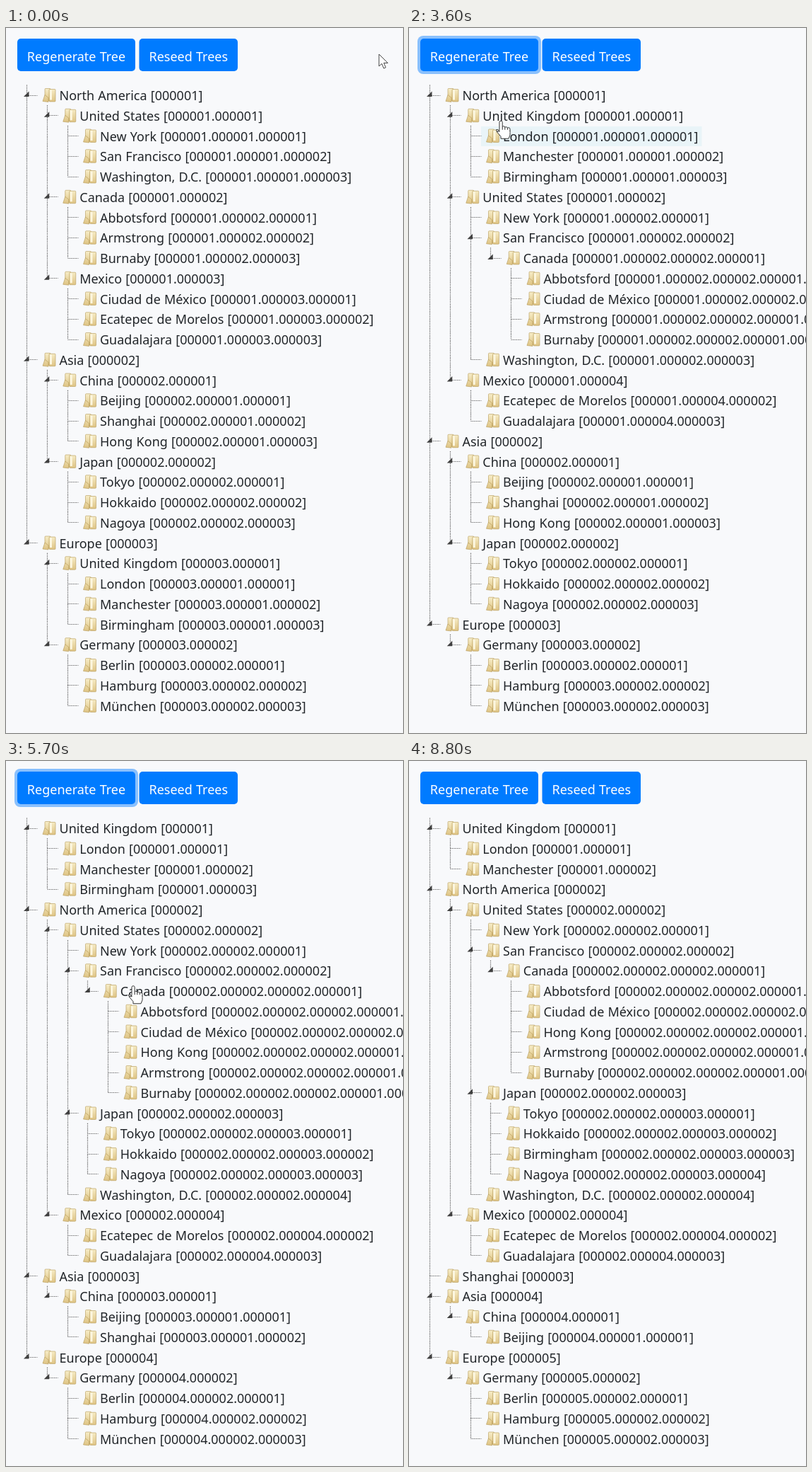
These frames come from a looping animation (562 px wide and 996 px high, 9.1 s). An HTML page with a canvas:

```html
<!DOCTYPE html>
<html lang="en">
<head>
<meta charset="utf-8">
<title>Tree drag and drop</title>
<style>
  html, body { margin: 0; width: 100%; height: 100%; overflow: hidden; background: #f8f9fb; }
  canvas { display: block; }
</style>
</head>
<body>
<canvas id="stage" width="562" height="996"></canvas>
<script>
const ctx = document.getElementById('stage').getContext('2d');
const LOOP = 9100, TICK = 100, ROW = 28.75, FIRST_ROW = 95.5, PALM = 9;
const CLICK = 1300, BLUR = 8700, EXIT = 8300;
const INK = '#212529';

const OUTLINE = `North America
 United States
  New York
  San Francisco
  Washington, D.C.
 Canada
  Abbotsford
  Armstrong
  Burnaby
 Mexico
  Ciudad de México
  Ecatepec de Morelos
  Guadalajara
Asia
 China
  Beijing
  Shanghai
  Hong Kong
 Japan
  Tokyo
  Hokkaido
  Nagoya
Europe
 United Kingdom
  London
  Manchester
  Birmingham
 Germany
  Berlin
  Hamburg
  München`;

const drag = (name, mode, target, x, pick, drop) => ({ name, mode, target, x, pick, drop });
const DRAGS = [
  drag('Canada', 'over', 'San Francisco', 165, 700, 1000),
  drag('Ciudad de México', 'after', 'Abbotsford', 190, 1700, 1900),
  drag('United Kingdom', 'before', 'United States', 130, 2700, 3600),
  drag('United Kingdom', 'before', 'North America', 130, 3700, 4200),
  drag('Hong Kong', 'after', 'Ciudad de México', 198, 4800, 5100),
  drag('Japan', 'after', 'San Francisco', 180, 5400, 5700),
  drag('Shanghai', 'before', 'Asia', 150, 6100, 6300),
  drag('Birmingham', 'after', 'Hokkaido', 146, 6600, 6900)
];

function buildTree(t) {
  const root = { children: [] }, byName = {}, open = [root];
  for (const line of OUTLINE.split('\n')) {
    const name = line.trim(), level = line.length - name.length;
    const parent = open[level], node = { name, parent, children: [] };
    node.num = parent.children.push(node);
    byName[name] = open[level + 1] = node;
  }
  for (const d of DRAGS) {
    if (t >= d.drop) moveNode(byName[d.name], d.mode, byName[d.target]);
  }
  // a first child stays folded until the tree is regenerated
  byName['San Francisco'].collapsed = t <= CLICK;
  return root;
}

function moveNode(node, mode, target) {
  const old = node.parent.children;
  old.splice(old.indexOf(node), 1);
  const inside = mode === 'over', step = Number(mode === 'after');
  const parent = node.parent = inside ? target : target.parent;
  const list = parent.children;
  const index = inside ? list.length : list.indexOf(target) + step;
  node.num = inside ? list.length + 1 : target.num + step;
  for (const sibling of list) if (sibling.num >= node.num) sibling.num++;
  list.splice(index, 0, node);
}

function listRows(parent, level = 0, prefix = '', rows = []) {
  for (const node of parent.children) {
    const path = prefix + String(node.num).padStart(6, '0');
    node.x = level * ROW;
    node.y = FIRST_ROW + rows.length * ROW;
    node.label = `${node.name} [${path}]`;
    rows.push(node);
    if (!node.collapsed) listRows(node, level + 1, path + '.', rows);
  }
  return rows;
}

const rowsAt = t => listRows(buildTree(t));
const rowNamed = (rows, name) => rows.find(row => row.name === name);

// The pointer visits each picked row, each drop spot and the first button.
const DROP_DY = { before: 7, over: 7, after: 21 };
const stop = (t, x, y) => ({ t, x, y });
const STOPS = [
  stop(0, 528, 37),
  ...[CLICK, CLICK + TICK, 7500, 7900].map(t => stop(t, 100, 42)),
  stop(EXIT, 425, 75),
  ...DRAGS.flatMap(d => [
    stop(d.pick, d.x, rowNamed(rowsAt(d.pick), d.name).y - PALM),
    stop(d.drop, d.x, rowNamed(rowsAt(d.drop - TICK), d.target).y + DROP_DY[d.mode])
  ])
].sort((a, b) => a.t - b.t);

function pointerAt(t) {
  const i = STOPS.findIndex(s => s.t > t);
  if (i < 0) return { ...STOPS[STOPS.length - 1], resting: true };
  const a = STOPS[i - 1], b = STOPS[i];
  const e = 1 - (1 - (t - a.t) / (b.t - a.t)) ** 5;
  return { x: a.x + (b.x - a.x) * e, y: a.y + (b.y - a.y) * e, resting: b.t - t <= TICK };
}

function at(x, y, draw) {
  ctx.save();
  ctx.translate(x, y);
  draw();
  ctx.restore();
}

function polygon(points, fill, stroke) {
  ctx.beginPath();
  points.forEach(([x, y]) => ctx.lineTo(x, y));
  ctx.closePath();
  ctx.fillStyle = fill;
  ctx.fill();
  if (!stroke) return;
  ctx.strokeStyle = stroke;
  ctx.lineWidth = 1;
  ctx.lineJoin = 'round';
  ctx.stroke();
}

function roundRect(x, y, w, h, r, fill, stroke) {
  ctx.beginPath();
  ctx.roundRect(x, y, w, h, r);
  ctx.fillStyle = fill;
  ctx.fill();
  if (!stroke) return;
  ctx.strokeStyle = stroke;
  ctx.lineWidth = 1;
  ctx.stroke();
}

function text(label, x, y, color) {
  ctx.fillStyle = color;
  ctx.fillText(label, x, y);
}

function verticalFade(top, bottom, from, to) {
  const fade = ctx.createLinearGradient(0, top, 0, bottom);
  fade.addColorStop(0, from);
  fade.addColorStop(1, to);
  return fade;
}

function dotted(x1, y1, x2, y2) {
  ctx.beginPath();
  ctx.moveTo(x1, y1);
  ctx.lineTo(x2, y2);
  ctx.stroke();
}

function drawConnectors(node) {
  const siblings = node.parent.children, last = siblings[siblings.length - 1];
  const x = Math.round(node.x + 29) + 0.5, y = Math.round(node.y - 1) + 0.5;
  ctx.strokeStyle = '#5c5c5c';
  ctx.lineWidth = 1.2;
  ctx.setLineDash([1.2, 1.2]);
  dotted(x, y, x + 15, y);
  if (node === siblings[0]) dotted(x, node.y - 15, x, last.y - 1);
  ctx.setLineDash([]);
}

const drawPlayMark = () => polygon([[-3, -6], [3, 0], [-3, 6]], '#222');

function drawExpander(node) {
  if (!node.children.length) return;
  at(node.x + 29.5, node.y, () => {
    if (node.collapsed) drawPlayMark();
    else polygon([[3, -6], [3, 1.5], [-4.5, 1.5]], '#404040');
  });
}

function drawFolder() {
  const paper = verticalFade(-10, 10, '#f7edc8', '#dcc07e');
  const edge = 'rgba(176,146,78,0.55)';
  roundRect(4, -10, 8, 17, 1, paper, edge);
  roundRect(10, -9, 9, 17.5, 1, paper, edge);
  ctx.fillStyle = '#fcf6df';
  ctx.fillRect(11, -8, 3, 14);
  polygon([[4, -1], [9, 3], [9, 9], [1, 8]], paper, edge);
}

function drawRow(node, hovered) {
  if (hovered) {
    ctx.fillStyle = '#e9f4f8';
    ctx.fillRect(node.x + 44.5, node.y - 14, ctx.measureText(node.label).width + 36, 28);
  }
  drawConnectors(node);
  drawExpander(node);
  at(node.x + 51, node.y, drawFolder);
  text(node.label, node.x + 75.5, node.y + 6.5, INK);
}

function drawButton(label, x, w, hovered, ring) {
  if (ring) roundRect(x - 4, 11, w + 8, 54, 8, `rgba(0,123,255,${ring * 0.45})`);
  roundRect(x, 15, w, 46, 5, hovered ? '#0069d9' : '#007bff');
  ctx.textAlign = 'center';
  text(label, x + w / 2, 46.5, '#fff');
  ctx.textAlign = 'left';
}

function drawArrow() {
  polygon([[0, 0], [0, 17], [4, 13.4], [6.8, 20], [9.6, 18.8], [6.8, 12.4], [12.5, 12.4]],
    '#fff', '#444');
}

function drawHand() {
  const line = '#333';
  polygon([[-2, 17], [-7, 13], [-5, 12], [-1, 15]], '#fff', line);
  for (let finger = 3; finger >= 0; finger--) {
    const top = finger ? 6.5 + finger : 0;
    roundRect(-2 + finger * 3.6, top, 4.2, 16 - top, 2, '#fff', line);
  }
  polygon([[-6, 15], [0, 22], [0, 25], [11, 25], [13, 20], [13, 14]], '#fff', line);
  ctx.fillStyle = '#fff';
  ctx.fillRect(-1.4, 12.5, 13.6, 5);
}

function drawCheck() {
  polygon([[-9, -1], [-5, -4], [-2, 0], [5, -7], [9, -5], [-1, 7]],
    verticalFade(-7, 8, '#7ad65a', '#168a16'), '#2a9a2a');
}

function drawDrag({ name, mode, target, drop }, rows, t, { x, y }) {
  if (t >= drop - 2 * TICK) {
    const goal = rowNamed(rows, target);
    const edge = { before: -0.5, over: 0, after: 0.5 }[mode];
    at(goal.x + 40, goal.y + edge * ROW - 1, drawPlayMark);
  }
  ctx.globalAlpha = 0.85;
  at(x + 25, y + 26, drawCheck);
  text(rowNamed(rows, name).label, x + 40.5, y + 33, INK);
  ctx.globalAlpha = 1;
}

function render(t) {
  const pointer = pointerAt(t), rows = rowsAt(t);
  const active = DRAGS.find(d => t >= d.pick && t < d.drop);
  const visible = t <= EXIT;

  ctx.fillStyle = '#f8f9fb';
  ctx.fillRect(0, 0, 562, 996);
  ctx.font = '18px "Noto Sans", "Open Sans", sans-serif';
  ctx.wordSpacing = '0.5px';

  const overButton = pointer.x < 183 && pointer.y < 61;
  const ring = t < CLICK ? 0 : Math.max(0, Math.min(1, (BLUR + TICK - t) / (2 * TICK)));
  drawButton('Regenerate Tree', 16, 167, overButton, ring);
  drawButton('Reseed Trees', 188.5, 139.5, false, 0);

  const canHover = visible && pointer.resting && !active;
  for (const row of rows) {
    drawRow(row, canHover && Math.abs(row.y - pointer.y - PALM) < ROW / 2);
  }

  if (!visible) return;
  if (active) drawDrag(active, rows, t, pointer);
  at(pointer.x, pointer.y, t < 2 * TICK ? drawArrow : drawHand);
}

let shown = -1;
function loop(now) {
  const t = Math.floor((now % LOOP) / TICK) * TICK;
  if (t !== shown) render(shown = t);
  requestAnimationFrame(loop);
}
render(0);
requestAnimationFrame(loop);
</script>
</body>
</html>
```
